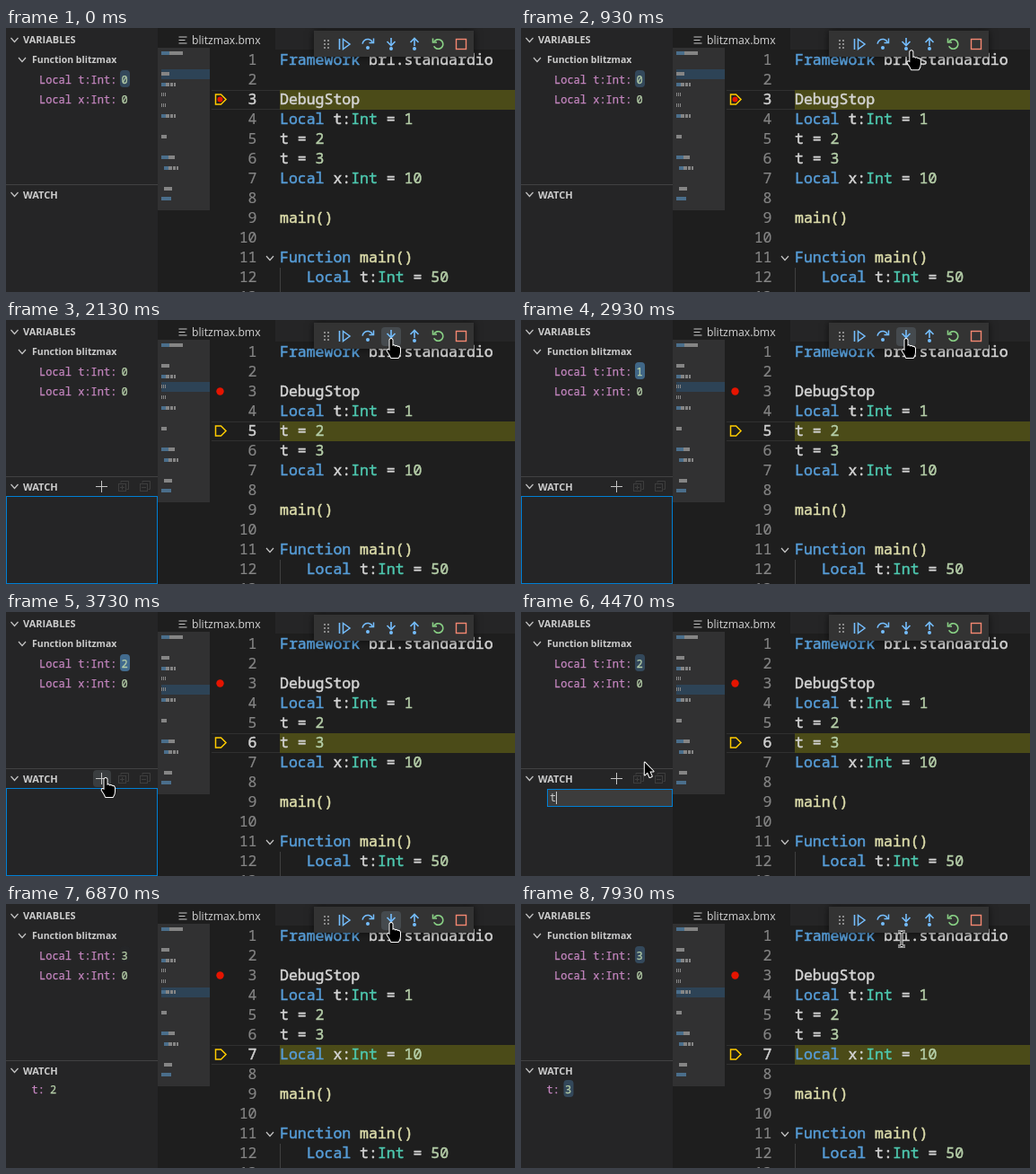
Write an HTML page with a canvas that moves like this. It is 567x294 px and loops after 8000 ms.

```html
<!DOCTYPE html>
<html lang="en">
<head>
<meta charset="utf-8">
<title>Debugger session</title>
<style>
html, body { margin: 0; width: 100%; height: 100%; overflow: hidden; background: #1e1e1e; }
canvas { display: block; width: 567px; height: 294px; }
</style>
</head>
<body>
<canvas id="stage" width="567" height="294"></canvas>
<script>
const ctx = document.getElementById('stage').getContext('2d');
const LOOP = 8000;
const MONO = '"Noto Sans Mono", "DejaVu Sans Mono", monospace';
const SANS = '"Open Sans", "Noto Sans", sans-serif';
const CODE_FONT = '16.5px ' + MONO;
const TREE_FONT = '12px ' + MONO;
const C = {
  key: '#569cd6', type: '#4ec9b0', num: '#b5cea8', fn: '#dcdcaa', text: '#d4d4d4',
  name: '#c586c0', blue: '#75beff', green: '#89d185', red: '#f48771', side: '#252526'
};

// Source lines as [text, colour] tokens
const local = (name, value) => [['Local ', C.key], [name + ':', C.text], ['Int', C.type], [' = ', C.text], [value, C.num]];
const assign = value => [['t = ', C.text], [value, C.num]];
const CODE = {
  1: [['Framework ', C.key], ['brl.standardio', C.text]],
  3: [['DebugStop', C.text]],
  4: local('t', '1'),
  5: assign('2'),
  6: assign('3'),
  7: local('x', '10'),
  9: [['main()', C.fn]],
  11: [['Function ', C.key], ['main()', C.fn]],
  12: [['   ', C.text], ...local('t', '50')]
};
// Minimap marks: line, x, width, leading keyword width
const MINI = [[1, 173, 24, 9], [3, 173, 9, 0], [4, 173, 16, 5], [5, 173, 5, 0], [6, 173, 5, 0], [7, 173, 16, 5],
  [9, 173, 6, 0], [11, 173, 15, 8], [12, 176, 16, 5], [14, 176, 9, 0], [15, 173, 11, 11]];

// Pointer track: time, x, y
const TRACK = [[530, 509, 69], [730, 470, 45], [870, 440, 28], [1000, 429, 20], [3130, 429, 20], [3330, 276, 70],
  [3530, 150, 160], [3700, 111, 184], [3930, 111, 184], [4170, 137, 166], [5530, 137, 166], [5730, 116, 185],
  [5930, 240, 120], [6130, 455, 24], [6290, 429, 20], [7680, 429, 20], [7800, 456, 26], [7920, 424, 39]];

// Latest value of a list of [start, value] steps
const at = (steps, t) => steps.filter(s => s[0] <= t).pop()[1];
const STEP_LINE = [[0, 3], [1470, 4], [2070, 5], [3000, 6], [6470, 7]];
const VAR_T = [[0, '0'], [2530, '1'], [3350, '2'], [6870, '3']];
const VAR_FLASH = [[0, -1000], [1870, null], [2530, 2470], [3350, 3350], [5000, null], [6870, 6870]];
const WATCH_T = [[0, '2'], [6930, '3']];
const WATCH_FLASH = [[0, null], [6930, 6930]];

const rowTop = n => 25 + 22 * (n - 1);
const miniY = n => Math.round(28 + 11.6 * (n - 1));

function rect(x, y, w, h, fill) {
  ctx.fillStyle = fill;
  ctx.fillRect(x, y, w, h);
}

function round(x, y, w, h, r, fill) {
  ctx.fillStyle = fill;
  ctx.beginPath();
  ctx.roundRect(x, y, w, h, r);
  ctx.fill();
}

// A thin stroke of the same colour thickens the letters
function text(str, x, y, font, fill, { align = 'left', extra = 0 } = {}) {
  ctx.font = font;
  ctx.fillStyle = ctx.strokeStyle = fill;
  ctx.textAlign = align;
  ctx.fillText(str, x, y);
  if (!extra) return;
  ctx.lineWidth = extra;
  ctx.strokeText(str, x, y);
}

function line(points, color, width = 1.5, close = false) {
  ctx.beginPath();
  points.forEach(([x, y]) => ctx.lineTo(x, y));
  if (close) ctx.closePath();
  ctx.strokeStyle = color;
  ctx.lineWidth = width;
  ctx.stroke();
}

function dot(x, y, r, fill) {
  ctx.fillStyle = fill;
  ctx.beginPath();
  ctx.arc(x, y, r, 0, Math.PI * 2);
  ctx.fill();
}

function arc(x, y, r, from, to, color) {
  ctx.beginPath();
  ctx.arc(x, y, r, from, to);
  ctx.strokeStyle = color;
  ctx.lineWidth = 1.6;
  ctx.stroke();
}

const chevron = (x, y) => line([[x - 4, y - 2], [x, y + 2.5], [x + 4, y - 2]], '#c5c5c5', 1.2);

function pointerAt(t) {
  if (t < TRACK[0][0]) return null;
  const i = TRACK.findIndex(k => k[0] > t);
  if (i < 0) return TRACK[TRACK.length - 1].slice(1);
  const [a, b] = [TRACK[i - 1], TRACK[i]];
  const k = (t - a[0]) / (b[0] - a[0]);
  return [a[1] + (b[1] - a[1]) * k, a[2] + (b[2] - a[2]) * k];
}

// Changed values flash up quickly, then settle to a faint tint
function flashAlpha(start, t) {
  if (start === null) return 0;
  const k = Math.min((t - start) / 1000, 1);
  return k < 0.05 ? 15 * k : 0.75 - 0.45 * (k - 0.05) / 0.95;
}

const treeText = (str, x, y, color) => text(str, x, y, TREE_FONT, color, { extra: 0.25 });

function value(str, x, base, alpha) {
  if (alpha > 0) round(x - 1.5, base - 15, 11, 19, 4, `rgba(86,156,214,${alpha})`);
  treeText(str, x, base, C.num);
}

function drawMinimap(current) {
  rect(169, 22, 58, 181, '#313132');
  rect(173, miniY(current) - 5, 54, 11, '#2d4356');
  for (const [n, x, w, key] of MINI) {
    for (let i = 0; i < w; i++) {
      const gap = w === 16 && i > key && i % 4 === 1 || w === 5 && i % 2;
      if (!gap) rect(x + i, miniY(n) - 2, 1, 4, i < key ? '#4a6e8b' : '#858585');
    }
  }
}

function drawEditor(t) {
  const current = at(STEP_LINE, t);
  const top = rowTop(current);
  const mid = top + 10.5;
  rect(169, 0, 398, 294, '#1e1e1e');
  rect(300, 0, 267, 24, C.side);
  [10, 13.5, 17].forEach((y, i) => line([[192.5, y], [i === 1 ? 199.5 : 201.5, y]], '#c5c5c5', 1));
  text('blitzmax.bmx', 207, 18, '12.2px ' + SANS, '#d4d4d4');
  drawMinimap(current);

  rect(229, top, 76, 1, '#303030');
  rect(229, top + 21, 76, 1, '#303030');
  rect(305, top, 262, 22, '#4b4b18');
  rect(305, rowTop(12), 1, 28, '#404040');

  for (let n = 1; n <= 13; n++) {
    const base = rowTop(n) + 16;
    const active = n === current;
    text(n, 279.5, base, CODE_FONT, active ? '#d0d0d0' : '#858585', { align: 'right', extra: active ? 0.5 : 0.2 });
    let x = 305;
    for (const [str, color] of CODE[n] || []) {
      text(str, x, base, CODE_FONT, color, { extra: 0.5 });
      x += str.length * 9.9;
    }
  }
  chevron(294, 256);

  dot(238.5, rowTop(3) + 10.5, current > 3 ? 4.2 : 3, '#e51400');
  line([[233.5, mid - 5.5], [239.5, mid - 5.5], [245, mid], [239.5, mid + 5.5], [233.5, mid + 5.5]], '#ffcc00', 1.5, true);
}

function drawToolbar(t, pointer) {
  ctx.save();
  ctx.shadowColor = 'rgba(0,0,0,.6)';
  ctx.shadowBlur = 8;
  rect(343, 3, 178, 29, '#333333');
  ctx.restore();

  if (pointer && t >= 1270 && pointer[1] < 32 && pointer[0] > 390) {
    const slot = Math.round((pointer[0] - 377) / 26);
    round(366 + slot * 26, 8, 22, 21, 4, '#454a4e');
  }
  for (let i = 0; i < 6; i++) rect(354 + (i % 2) * 4, 13 + (i >> 1) * 4, 2, 2, '#8a8a8a');

  line([[371.5, 12], [371.5, 24]], C.blue, 1.6);
  line([[375.5, 12.5], [383, 18], [375.5, 23.5]], C.blue, 1.5, true);

  arc(403, 18.5, 6, Math.PI * 1.05, Math.PI * 1.85, C.blue);
  line([[409.5, 11.5], [409.5, 16.5], [404.5, 16.5]], C.blue);
  dot(403, 22, 2, C.blue);

  line([[429, 11], [429, 19]], C.blue, 1.6);
  line([[424.5, 15], [429, 19.5], [433.5, 15]], C.blue, 1.6);
  dot(429, 23, 2, C.blue);

  line([[455, 12], [455, 20]], C.blue, 1.6);
  line([[450.5, 16], [455, 11.5], [459.5, 16]], C.blue, 1.6);
  dot(455, 23, 2, C.blue);

  arc(481.5, 18, 5.3, -2.6, 2.7, C.green);
  line([[475.5, 11.5], [475.5, 16], [480, 16]], C.green, 1.6);

  ctx.strokeStyle = C.red;
  ctx.lineWidth = 1.4;
  ctx.strokeRect(501.5, 12.5, 11, 11);
}

function drawWatchIcons(hover) {
  const dim = '#3e3e3e';
  if (hover) round(97, 176, 20, 19, 4, '#3a3d3f');
  line([[100, 185.5], [113, 185.5]], '#c5c5c5', 1);
  line([[106.5, 179], [106.5, 192]], '#c5c5c5', 1);
  for (const x of [125, 149]) {
    line([[x + 3, 181.5], [x + 3, 179.5], [x + 11.5, 179.5], [x + 11.5, 188.5], [x + 9.5, 188.5]], dim, 1);
    ctx.strokeRect(x + 0.5, 182.5, 8, 8);
    line([[x + 2, 186.5], [x + 7, 186.5]], dim, 1);
    if (x === 125) line([[x + 4.5, 184], [x + 4.5, 189]], dim, 1);
  }
}

function drawWatchInput(t) {
  rect(29, 197, 140, 20, '#007fd4');
  rect(30, 198, 138, 18, '#3c3c3c');
  const typed = t >= 4470;
  if (typed) text('t', 32, 211, TREE_FONT, '#cccccc');
  else text('Expression to watch', 32, 211, TREE_FONT, '#8c8c8c');
  if (t < 4670) rect(typed ? 39 : 31, 200, 1, 14, '#cccccc');
}

function drawSidebar(t, pointer) {
  const head = '700 11px ' + SANS;
  rect(0, 0, 169, 294, C.side);
  chevron(9.5, 13);
  text('VARIABLES', 19, 17, head, '#cccccc');
  chevron(18, 35);
  text('Function blitzmax', 29, 39, '700 10.5px ' + SANS, '#cccccc');
  treeText('Local t:Int:', 37, 62, C.name);
  value(at(VAR_T, t), 128.5, 62, flashAlpha(at(VAR_FLASH, t), t));
  treeText('Local x:Int:', 37, 84, C.name);
  value('0', 128.5, 84, 0);

  rect(0, 174, 169, 1, '#424243');
  chevron(9.5, 185);
  text('WATCH', 19, 190, head, '#cccccc');
  const over = pointer && pointer[0] < 169 && pointer[1] > 174;
  if (over || t >= 1270 && t < 5000) drawWatchIcons(over && pointer[0] > 97 && pointer[0] < 118);

  if (t >= 5000) {
    treeText('t:', 28.5, 211, C.name);
    value(at(WATCH_T, t), 49, 211, flashAlpha(at(WATCH_FLASH, t), t));
  } else if (t >= 3930) {
    drawWatchInput(t);
  } else if (t >= 1270) {
    ctx.strokeStyle = '#007fd4';
    ctx.lineWidth = 1;
    ctx.strokeRect(0.5, 196.5, 168, 97);
  }
}

function outlined(path) {
  ctx.lineJoin = 'round';
  ctx.strokeStyle = '#ffffff';
  ctx.lineWidth = 2;
  ctx.stroke(path);
  ctx.fillStyle = '#000000';
  ctx.fill(path);
  ctx.lineJoin = 'miter';
}

const ARROW = new Path2D('M.8 1.5V15.5L4 12.6L6.4 18L8.8 17L6.4 11.6H10.6Z');
const HAND = new Path2D('M-1.5 2Q0 0 1.5 2V9Q3 7.5 4.4 9.4Q6 8.2 7.2 10Q9.2 9.4 10 11.5V16Q10 19 8 22H0Q-1 19-4.3 14.4Q-4.6 11.6-1.5 14Z');
const BEAM = new Path2D('M-4-8H-1L0-7L1-8H4M0-7V7M-4 8H-1L0 7L1 8H4');

function drawPointer([x, y]) {
  const onToolbar = x > 343 && x < 521 && y < 32;
  const onWatch = x > 97 && x < 162 && y > 175 && y < 196;
  ctx.save();
  ctx.translate(x, y);
  if (onToolbar || onWatch) {
    outlined(HAND);
  } else if (x > 229) {
    ctx.strokeStyle = '#ffffff';
    ctx.lineWidth = 3;
    ctx.stroke(BEAM);
    ctx.strokeStyle = '#000000';
    ctx.lineWidth = 1;
    ctx.stroke(BEAM);
  } else {
    outlined(ARROW);
  }
  ctx.restore();
}

function draw(now) {
  const t = now % LOOP;
  const pointer = pointerAt(t);
  drawEditor(t);
  drawToolbar(t, pointer);
  drawSidebar(t, pointer);
  if (pointer) drawPointer(pointer);
}

const begin = performance.now();
function tick() {
  draw(performance.now() - begin);
  requestAnimationFrame(tick);
}
tick();
</script>
</body>
</html>
```
